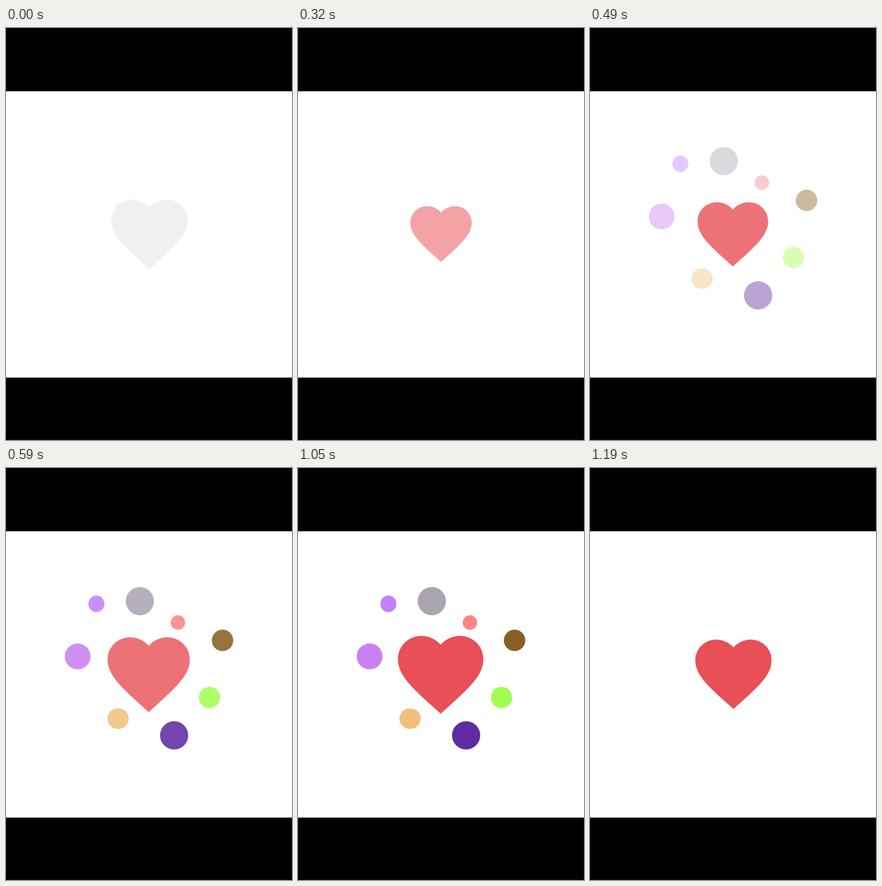
Animation of 624x898 px, one loop 1980 ms. Source, as an HTML page with a canvas:

```html
<!DOCTYPE html>
<html>
<head>
<meta charset="utf-8">
<title>Like button</title>
<style>
  html, body { margin: 0; height: 100%; overflow: hidden; background: #000; }
  canvas { display: block; }
</style>
</head>
<body>
<canvas id="stage" width="624" height="898"></canvas>
<script>
const ctx = document.getElementById('stage').getContext('2d');
const LOOP = 1980;
const GRAY = '#f0f0f2', RED = '#e94f56';

const heart = new Path2D('M12 21.35l-1.45-1.32C5.4 15.36 2 12.28 2 8.5 2 5.42 4.42 3 7.5 3c1.74 0 3.41.81 4.5 2.09C13.09 3.81 14.76 3 16.5 3 19.58 3 22 5.42 22 8.5c0 3.78-3.4 6.86-8.55 11.54z');

// Heart poses: width, centre x, centre y
const REST = [166.4, 313, 449.7];
const SMALL = [130, 312, 449];
const LARGE = [186.5, 311.25, 450.75];

// Dots: x, y, rx, ry, colour
const dots = [
  [197.2, 296, 17.5, 18.1, '#c180ff'],
  [292, 290.3, 30.8, 30.8, '#aba5b2'],
  [375.1, 336.8, 15.8, 15.8, '#ff8487'],
  [472.5, 375.7, 23.4, 23.4, '#885f24'],
  [444, 500.3, 23.3, 23.3, '#a1ff50'],
  [366.8, 582.8, 30.8, 30.8, '#5e2ca0'],
  [244.5, 546.3, 23.3, 22.4, '#f2c07c'],
  [156.3, 410.7, 28.2, 28.2, '#ca80f2']
];

const mix = (a, b, p) => a.map((v, i) => v + (b[i] - v) * p);

// Eased progress of t from start to end
function ease(t, start, end) {
  const p = Math.min(1, Math.max(0, (t - start) / (end - start)));
  return p * p * (3 - 2 * p);
}

function drawHeart([w, x, y], color, alpha) {
  const s = w / 20;
  ctx.save();
  ctx.translate(x, y);
  ctx.scale(s, s * 0.9905);
  ctx.translate(-12, -12.175);
  ctx.globalAlpha = alpha;
  ctx.fillStyle = color;
  ctx.fill(heart);
  ctx.restore();
}

function drawDots(alpha) {
  ctx.globalAlpha = alpha;
  for (const [x, y, rx, ry, color] of dots) {
    ctx.fillStyle = color;
    ctx.beginPath();
    ctx.ellipse(x, y, rx, ry, 0, 0, 7);
    ctx.fill();
  }
  ctx.globalAlpha = 1;
}

function drawStage() {
  ctx.fillStyle = '#000';
  ctx.fillRect(0, 0, 624, 898);
  ctx.strokeStyle = '#161616';
  ctx.beginPath();
  ctx.roundRect(0.5, -20, 623, 917.5, 8);
  ctx.stroke();
  ctx.fillStyle = '#fff';
  ctx.fillRect(0, 138, 624, 624);
}

function draw(now) {
  const t = now % LOOP;
  const shrink = ease(t, 180, 356);
  const grow = ease(t, 354, 658);
  const deepen = ease(t, 900, 1050);
  const settle = ease(t, 1055, 1192);
  const pose = mix(mix(mix(REST, SMALL, shrink), LARGE, grow), REST, settle);

  drawStage();
  drawDots(grow * (1 - settle));
  drawHeart(pose, GRAY, 1 - shrink);
  drawHeart(pose, RED, 0.8 * shrink ** 4 + 0.2 * deepen);
  requestAnimationFrame(draw);
}
draw(0);
</script>
</body>
</html>
```
